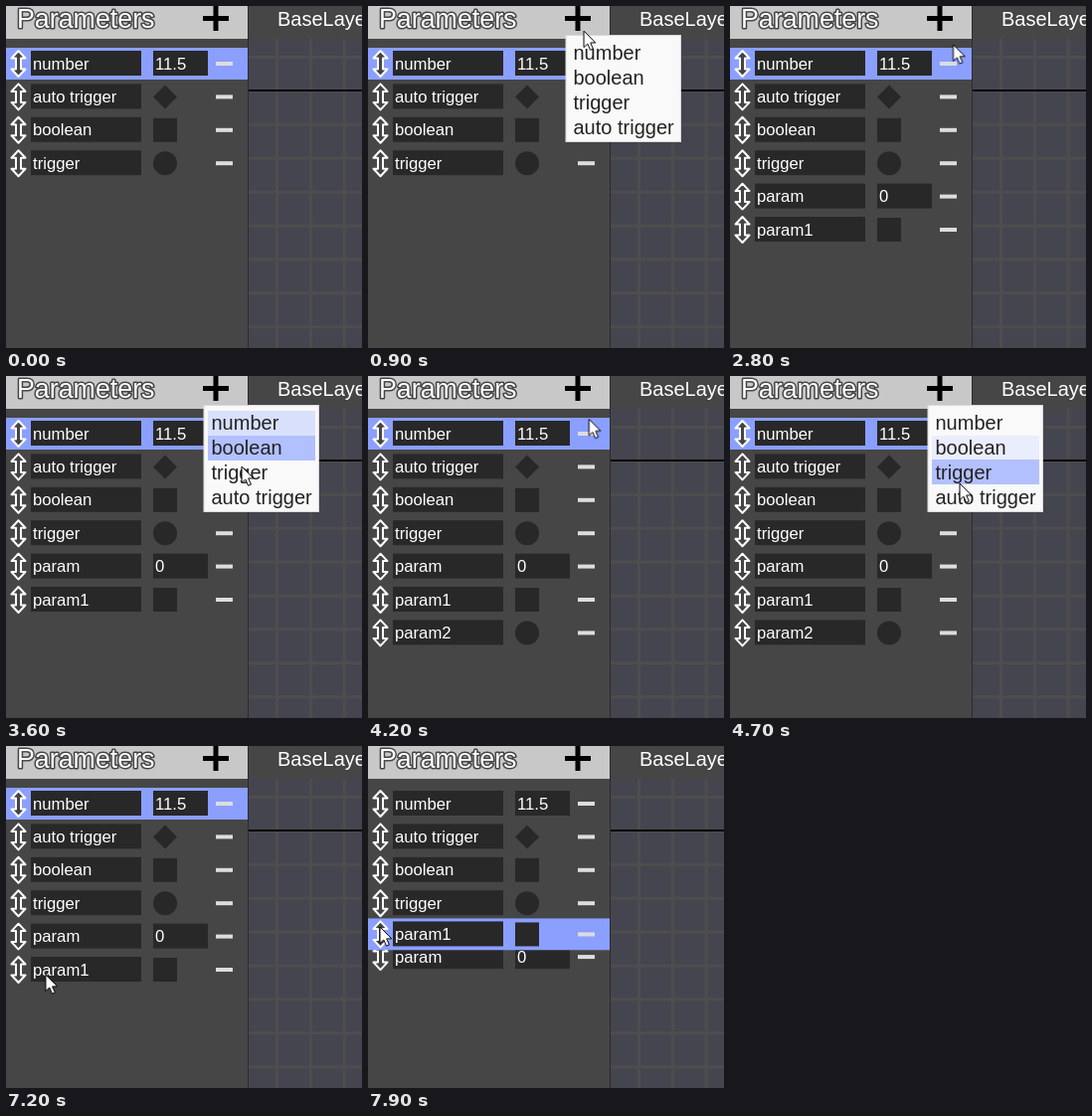
Animation of 358x344 px, one loop 8000 ms. Source, as an HTML page:

```html
<!DOCTYPE html>
<html lang="en">
<head>
<meta charset="utf-8">
<title>Parameter list</title>
<style>
html, body { margin: 0; width: 100%; height: 100%; overflow: hidden; background: #464646; }
svg { display: block; width: 358px; height: 344px; font-family: "Liberation Sans", Arial, sans-serif; }

.title { font-size: 26.8px; }
.tab { font-size: 20px; }
.title, .tab { fill: #fff; stroke: #444; stroke-width: 3px; stroke-linejoin: round; paint-order: stroke; }
.row text { font-size: 16.7px; fill: #fff; }
.field { fill: #282828; }
.select { fill: #8a9fff; }
.menu text { font-size: 20px; fill: #222; }
.hover { fill: #b2c0ff; opacity: 0; }

.anim { animation: 8s linear infinite; }
.toggle { animation: 8s step-end infinite; }
.menu { animation-name: menu; }
.deselect { animation-name: deselect; }
.pick { animation-name: pick; }
.add0 { animation-name: add0; }
.add1 { animation-name: add1; }
.add2 { animation-name: add2; }
.add3 { animation-name: add3; }
.dim2 { animation-name: dim2; }
.dim3 { animation-name: dim3; }
.shift { animation-name: shift; }
.drag { animation-name: drag; }
.hover0 { animation-name: hover0; }
.hover1 { animation-name: hover1; }
.hover2 { animation-name: hover2; }
.hover3 { animation-name: hover3; }
.cursor { animation-name: cursor; }

@keyframes menu {
  0%, 17.5%, 32.5%, 50%, 63.75%, 100% { visibility: hidden; }
  8.75%, 21.25%, 40%, 55% { visibility: visible; }
}
@keyframes deselect { 0% { visibility: visible; } 93.75%, 100% { visibility: hidden; } }
@keyframes pick { 0% { visibility: hidden; } 93.75%, 100% { visibility: visible; } }
@keyframes add0 { 0% { visibility: hidden; } 17.5%, 100% { visibility: visible; } }
@keyframes add1 { 0% { opacity: 0; } 32.5%, 100% { opacity: 1; } }
@keyframes add2 { 0%, 82.5%, 100% { visibility: hidden; } 50% { visibility: visible; } }
@keyframes add3 { 0%, 78.75%, 100% { visibility: hidden; } 63.75% { visibility: visible; } }
@keyframes dim2 { 0%, 82.5%, 100% { fill: #ddd; } 78.75% { fill: #8a8a8a; } }
@keyframes dim3 { 0%, 78.75%, 100% { fill: #ddd; } 75% { fill: #8a8a8a; } }

@keyframes shift {
  0%, 96.25% { transform: translateY(0); }
  98.75% { transform: translateY(20.4px); }
  100% { transform: translateY(30px); }
}
@keyframes drag {
  0%, 93.74% { transform: translateY(0); }
  93.75% { transform: translateY(6.5px); }
  98.75% { transform: translateY(-35.5px); }
  100% { transform: translateY(-42px); }
}

@keyframes hover0 {
  0%, 12.5%, 17.5%, 21.25%, 27.5%, 40%, 46.25%, 55%, 58.75%, 100% { opacity: 0; }
  15%, 17.49%, 23.75%, 42.5%, 56.25% { opacity: 1; }
  25% { opacity: .9; }
  45% { opacity: .45; }
}
@keyframes hover1 {
  0%, 23.75%, 32.5%, 42.5%, 47.5%, 56.25%, 60%, 100% { opacity: 0; }
  25% { opacity: .5; }
  27.5%, 32.49%, 45% { opacity: 1; }
  57.5% { opacity: .8; }
  58.75% { opacity: .22; }
}
@keyframes hover2 {
  0%, 45%, 50%, 57.5%, 60%, 100% { opacity: 0; }
  47.5%, 49.99%, 58.75% { opacity: 1; }
}
@keyframes hover3 {
  0%, 58.75%, 63.75%, 100% { opacity: 0; }
  60%, 63.74% { opacity: 1; }
}

@keyframes cursor {
  0%, 2.49% { transform: translate(400px, 66px); }
  2.5% { transform: translate(325px, 58px); }
  5% { transform: translate(252px, 34px); }
  7.5%, 8.75% { transform: translate(213px, 13px); }
  11.25% { transform: translate(217px, 25px); }
  12.5% { transform: translate(219px, 35px); }
  13.75%, 17.5% { transform: translate(220px, 38px); }
  20%, 21.25% { transform: translate(214px, 15px); }
  22.5% { transform: translate(222px, 38px); }
  25% { transform: translate(233px, 64px); }
  27.5% { transform: translate(236px, 70px); }
  32.5% { transform: translate(236px, 72px); }
  37.5% { transform: translate(213px, 6px); }
  40% { transform: translate(213px, 12px); }
  42.5% { transform: translate(226px, 50px); }
  45% { transform: translate(237px, 91px); }
  47.5%, 50% { transform: translate(239px, 97px); }
  53.75%, 55% { transform: translate(214px, 17px); }
  58.75% { transform: translate(231px, 108px); }
  60% { transform: translate(233px, 115px); }
  61.25%, 63.75% { transform: translate(235px, 118px); }
  70% { transform: translate(219px, 298px); }
  71.25%, 73.75% { transform: translate(217px, 303px); }
  76.25% { transform: translate(219px, 289px); }
  77.5% { transform: translate(219px, 286px); }
  78.75%, 82.5% { transform: translate(216px, 257px); }
  83.75% { transform: translate(212px, 252px); }
  90% { transform: translate(40px, 230px); }
  92.5% { transform: translate(12px, 225px); }
  93.75% { transform: translate(12px, 224px); }
  98.75% { transform: translate(12px, 182px); }
  100% { transform: translate(12px, 175px); }
}
</style>
</head>
<body>
<svg viewBox="0 0 358 344">
  <defs>
    <g id="base">
      <path d="M12.5-13 19.5-5.5H15V5.5H19.5L12.5 13 5.5 5.5H10V-5.5H5.5Z" fill="#444" stroke="#fff" stroke-width="2" stroke-linejoin="round"/>
      <rect class="field" x="25" y="-13" width="111" height="25"/>
    </g>
    <rect id="minus" x="211" y="-2" width="17" height="4"/>
    <rect id="value" class="field" x="148" y="-13" width="55" height="25"/>
    <rect id="square" class="field" x="148" y="-12" width="24" height="24"/>
    <circle id="circle" class="field" cx="160" r="12"/>
    <path id="diamond" class="field" d="M160-12 172 0 160 12 148 0Z"/>
    <rect id="band" class="select" y="-16" width="243" height="32"/>
    <rect id="cell" x="203" width="108" height="25"/>
    <pattern id="grid" x="271" y="50" width="33.9" height="33.9" patternUnits="userSpaceOnUse">
      <rect width="34" height="34" fill="#454550"/>
      <path d="M1.5 0V34M0 1.5H34" stroke="#4d4d4d" stroke-width="3"/>
    </pattern>
  </defs>

  <rect width="358" height="344" fill="#464646"/>
  <rect x="244" y="33" width="114" height="311" fill="url(#grid)"/>
  <rect x="244" y="84" width="114" height="2"/>
  <rect x="243" width="1" height="344" fill="#2c2c2c"/>
  <rect width="243" height="33" fill="#c8c8c8"/>
  <text class="title" x="11" y="22">Parameters</text>
  <path d="M198 12.5H224M211 0V25" stroke="#000" stroke-width="5"/>
  <text class="tab" x="273" y="19.5">BaseLayer</text>

  <g fill="#ddd">
    <g class="row" transform="translate(0 58)">
      <use class="toggle deselect" href="#band"/>
      <use href="#base"/><use href="#value"/><use href="#minus"/>
      <text x="27" y="5.5">number</text><text x="150" y="5.5">11.5</text>
    </g>
    <g class="row" transform="translate(0 91.4)">
      <use href="#base"/><use href="#diamond"/><use href="#minus"/>
      <text x="27" y="5.5">auto trigger</text>
    </g>
    <g class="row" transform="translate(0 124.8)">
      <use href="#base"/><use href="#square"/><use href="#minus"/>
      <text x="27" y="5.5">boolean</text>
    </g>
    <g class="row" transform="translate(0 158.2)">
      <use href="#base"/><use href="#circle"/><use href="#minus"/>
      <text x="27" y="5.5">trigger</text>
    </g>
    <g class="row" transform="translate(0 191.6)">
      <g class="toggle add0"><g class="anim shift">
        <use href="#base"/><use href="#value"/><use href="#minus"/>
        <text x="27" y="5.5">param</text><text x="150" y="5.5">0</text>
      </g></g>
    </g>
    <g class="row" transform="translate(0 258.4)">
      <g class="toggle add2">
        <use href="#base"/><use href="#circle"/><use class="toggle dim2" href="#minus"/>
        <text x="27" y="5.5">param2</text>
      </g>
    </g>
    <g class="row" transform="translate(0 291.8)">
      <g class="toggle add3">
        <use href="#base"/><use href="#diamond"/><use class="toggle dim3" href="#minus"/>
        <text x="27" y="5.5">param3</text>
      </g>
    </g>
    <g class="row" transform="translate(0 225)">
      <g class="toggle add1"><g class="anim drag">
        <use class="toggle pick" href="#band"/>
        <use href="#base"/><use href="#square"/><use href="#minus"/>
        <text x="27" y="5.5">param1</text>
      </g></g>
    </g>
  </g>

  <g class="toggle menu">
    <rect x="199" y="29.5" width="115.5" height="107" fill="#f9f9f9" stroke="#d8d8d8"/>
    <use class="hover anim hover0" href="#cell" y="34.5"/>
    <use class="hover anim hover1" href="#cell" y="59.5"/>
    <use class="hover anim hover2" href="#cell" y="84"/>
    <use class="hover anim hover3" href="#cell" y="109"/>
    <text x="206.5" y="54">number</text>
    <text x="206.5" y="79">boolean</text>
    <text x="206.5" y="104">trigger</text>
    <text x="206.5" y="129">auto trigger</text>
  </g>

  <path class="anim cursor" d="M0 0V16.5L3.8 13 6.5 19.2 9.4 18 6.7 11.9H11.8Z" fill="#fff" stroke="#000"/>
</svg>
<script>
// Advance the CSS animations on a shared 100 ms clock.
const LOOP = 8000, STEP = 100;
const anims = document.getAnimations();
anims.forEach(a => a.pause());
const start = performance.now();

function tick() {
  const t = (performance.now() - start) % LOOP;
  const snapped = Math.floor(t / STEP) * STEP + 1;
  anims.forEach(a => { a.currentTime = snapped; });
  requestAnimationFrame(tick);
}
tick();
</script>
</body>
</html>
```
